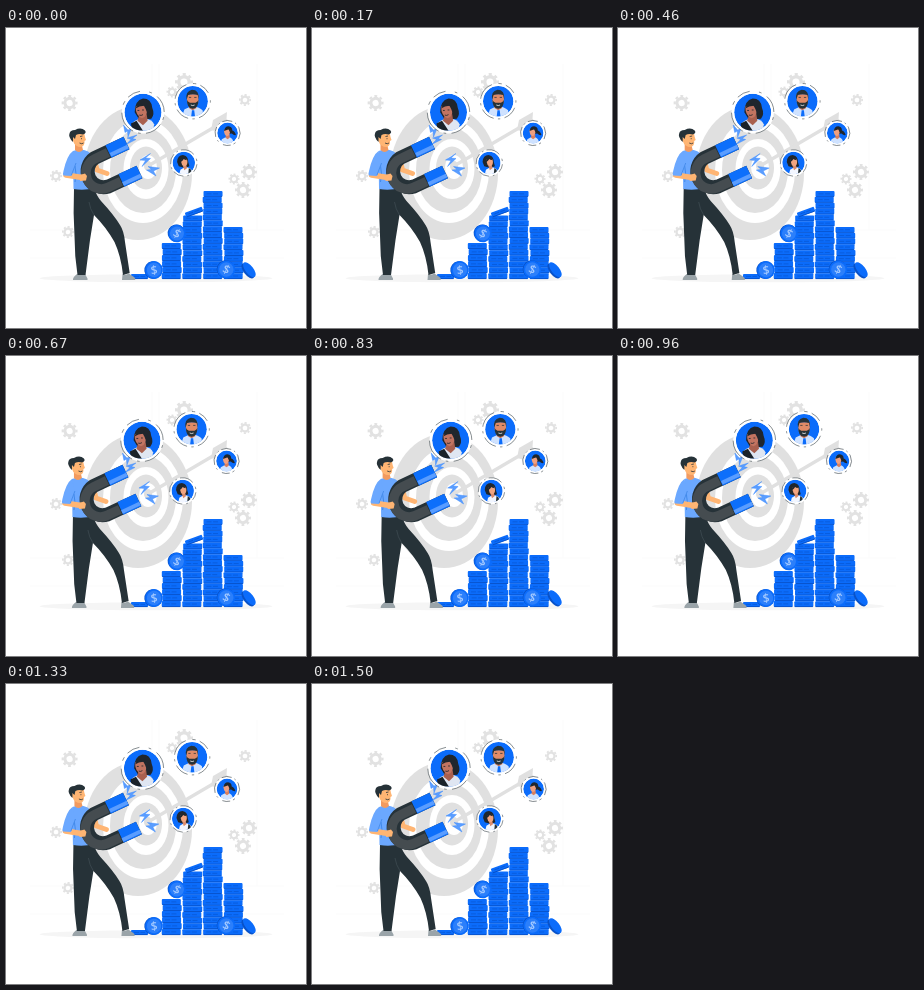
Animation, 300 px wide and 300 px high, one loop 1.54 s. Source, as an HTML page:

```html
<!DOCTYPE html>
<html lang="en">
<head>
<meta charset="utf-8">
<title>Attracting customers</title>
<style>
html, body { margin: 0; width: 100%; height: 100%; overflow: hidden; background: #fff; }
svg { display: block; width: 100%; height: 100%; }
text { font-family: "Open Sans", Arial, sans-serif; font-weight: 600; text-anchor: middle; }
</style>
</head>
<body>
<svg viewBox="0 0 300 300">
  <path d="M24 202H278M24 230H278M146 36V202M153 36V202M251 36V202" fill="none" stroke="#fafafa" stroke-width=".7"/>
  <g id="gears" fill="none" stroke="#e2e2e2"></g>
  <ellipse cx="150" cy="250.300" rx="116.500" ry="4" fill="#f5f5f5"/>

  <g id="target" fill="#e0e0e0">
    <ellipse cx="132" cy="145" rx="54" ry="67"/>
    <ellipse cx="137" cy="143" rx="40" ry="52" fill="#fff"/>
    <ellipse cx="137" cy="142" rx="33" ry="43"/>
    <ellipse cx="140" cy="141" rx="22.500" ry="30" fill="#fff"/>
    <ellipse cx="140" cy="140" rx="16" ry="21.500"/>
    <ellipse cx="142" cy="139" rx="9" ry="12" fill="#fff"/>
    <ellipse cx="142" cy="138" rx="4" ry="5"/>
    <path d="M142 138L212 97" stroke="#e0e0e0" stroke-width="3.300"/>
    <path d="M205 102L207 92L221 84L220.500 91L226 96L213 104Z"/>
  </g>

  <g id="coins"></g>

  <g id="shaker">
    <g id="man">
      <!-- far arm -->
      <path d="M84 129Q90 134 91 142L101 145.500" fill="none" stroke="#ffb573" stroke-width="5" stroke-linecap="round"/>
      <!-- shoes -->
      <path d="M71 246Q75 248 79 246L81.500 250.500V252H67Q66.500 249.500 71 246Z
               M116.500 246Q120 247.500 123 245.500L128.500 249.500Q130 251 129 252H116Z" fill="#9aa4a9"/>
      <!-- legs -->
      <path d="M68 160L88 159Q90 167 95 173Q108 187 114 197Q118 203 119 214L123.700 245L117 247
               Q115 228 108.500 214Q100 199 88 187L84 212L79.500 247H71.500Q68.500 228 68.500 208Q67 185 68 160Z" fill="#263238"/>
      <path d="M88 187Q84 181 83 174" fill="none" stroke="#45525a" stroke-width=".6"/>
      <!-- torso -->
      <path d="M67 123Q72 121 78 122Q86 124 88 131Q89 146 88.500 160Q78 163 67.500 161Q68 150 66 140Z" fill="#6ba8ff"/>
      <path d="M69 138Q71 146 69 154" fill="none" stroke="#2f7be0" stroke-width=".7"/>
      <!-- neck and head -->
      <path d="M69 114V122Q73 126 77 122L75.500 116Z" fill="#f29a5f"/>
      <path d="M66 106Q70 102 78 104L79 109L80 112L78.500 113Q79 118 75 119Q69 119 67 113Q64 112 65 109Z" fill="#ffb573"/>
      <path d="M67 114Q62 109 63.500 105.500Q64 102 69 102Q75 99 79 102.500Q81 105 77 106.500Q73 105.500 70 107L69 111L67 109Z" fill="#263238"/>
      <path d="M74 108.500L76.500 108M75.500 110.200V111.200M73.500 115Q76 116.500 77.500 115" fill="none" stroke="#263238" stroke-width=".8"/>
    </g>

    <g id="magnet" fill="none">
      <g stroke-width="14">
        <path d="M120.500 115L88.600 130A16 16 0 0 0 102.400 158.500L133.500 144" stroke="#263238"/>
        <path d="M120.500 115L102.400 123.500M133.500 144L115.400 152.400" stroke="#0d6ffb"/>
      </g>
      <path d="M102 124.500L89 130.800A15.300 15.300 0 0 0 102.200 159.400L115 153.500" stroke="#454c50" stroke-width="9.500"/>
      <path d="M122 118.500L104.500 126.800M135 147.500L117 156" stroke="#5a9dff" stroke-width="4"/>
    </g>

    <!-- near arm -->
    <path d="M60 147L76 149.500" stroke="#ffb573" stroke-width="5.500" stroke-linecap="round"/>
    <path d="M74 147L79 145.500L81 148L80 152.500L74 153Z" fill="#ffb573"/>
    <path d="M67 123Q61 127 57.500 143Q56.500 146 57.500 147.500L65.500 148L70 136Z" fill="#6ba8ff"/>
    <path d="M65.500 147L70 135" stroke="#2f7be0" stroke-width=".6"/>

    <g id="bolts" fill="#5a9dff" stroke="#2f83ff" stroke-width=".4" stroke-linejoin="round">
      <path d="M117.500 97L119 104.500L121.500 103L122 109L125.500 100.500L122 102Z"/>
      <path d="M131 107L121 110L125 111.500L120 116.500L130 111.500L126.500 110.500Z"/>
      <path d="M144.500 125.500L134 132L139.500 132.500L136 138.500L144.500 130.500L139.500 130Z"/>
      <path d="M153.500 140L142 138.500L145.500 141.500L140.500 142L150 148L147.500 143Z"/>
    </g>

    <g id="people"></g>
  </g>
</svg>
<script>
const get = id => document.getElementById(id);
const BLUE = '#0b6cfb', DEEP = '#0852c9', DARK = '#263238', HAIR = '#20262d';

// x, y, outer radius
const gears = [[63.6, 75, 8], [178, 54, 9], [166, 64, 5.5], [239, 72, 6], [50, 148, 6],
  [62, 204, 6], [243, 144, 8], [228, 151, 5.5], [237, 162, 8]];
get('gears').innerHTML = gears.map(([x, y, r]) => {
  const tooth = 2 * Math.PI * r * .86 / 16;
  return `<g transform="translate(${x} ${y}) rotate(-11.25)">
    <circle r="${r * .58}" stroke-width="${r * .38}"/>
    <circle r="${r * .86}" stroke-width="${r * .28}" stroke-dasharray="${tooth}"/></g>`;
}).join('');

function slab(x, y, w, h) {
  return `<rect x="${x}" y="${y}" width="${w}" height="${h}" rx="1" fill="${BLUE}"/>
    <path d="M${x + .5} ${y + h - .4}h${w - 1}" stroke="${DEEP}" stroke-width=".9"/>
    <path d="M${x + 3} ${y + h * .48}h${w - 6}" stroke="${DEEP}" stroke-width=".6" stroke-dasharray="5 1.5"/>`;
}

function stack(x, top, n) {
  const h = (251 - top) / n;
  return Array.from({ length: n }, (_, i) =>
    slab(x + Math.sin(i * 2.3 + x) * .5, top + i * h, 19, h)).join('');
}

function coin(x, y, r, tilt) {
  return `<g transform="translate(${x} ${y}) rotate(${tilt})">
    <circle cx="-.8" r="${r}" fill="${DEEP}"/><circle r="${r}" fill="${BLUE}"/>
    <circle r="${r - 1.7}" fill="#2b7ffb"/>
    <text y="4.200" font-size="12" fill="#a3c9ff">$</text></g>`;
}

get('coins').innerHTML = stack(156.2, 215, 6) + stack(176.8, 187.5, 11) + stack(197.2, 163, 15) + stack(218, 199, 9) +
  `<g transform="rotate(-20 188 184)">${slab(179, 181.5, 18, 5)}</g>` +
  slab(125, 246, 17, 5) +
  `<g transform="rotate(52 243 242)"><ellipse cx="243" cy="243.500" rx="9" ry="4" fill="${DEEP}"/>
   <ellipse cx="243" cy="241.500" rx="9" ry="4" fill="${BLUE}"/></g>` +
  coin(171, 205.5, 8.7, 30) + coin(148, 242, 8.9, -8) + coin(220.3, 241.5, 8.9, 25);

// Busts are drawn in a unit of 20 around the badge centre
const busts = [
  `<path d="M-9 0Q-9 -13 0 -15Q9 -15 10 -5Q13 2 9 7L-4 8Z" fill="${HAIR}"/>
   <path d="M-13 20L-11 11Q-5 6 3 7Q10 8 12 13L11 20Z" fill="#dfe6f2"/>
   <path d="M-4 3L4 2L5 9L0 14L-6 9Z" fill="#a9604f"/>
   <path d="M-8 -6Q-3 -10 4 -6Q6 4 -1 6.500Q-8 4 -8 -6Z" fill="#c27461"/>
   <path d="M-8 -4Q-6 -11 1 -10Q6 -8 5 2Q3 -4 1 -7Q-4 -7 -8 -4Z" fill="${HAIR}"/>
   <path d="M-6 -2H-4M-1 -2.500H1M-4 3Q-2 4 0 2.500" fill="none" stroke="${HAIR}" stroke-width=".9"/>
   <path d="M-13 12L-7 9L0 20H-12Z" fill="#1a2229"/>`,
  `<path d="M-14 20L-11 11Q-4 7 0 7Q8 7 13 12L14 20Z" fill="#cfe2ff"/>
   <path d="M-4 3H4L5 9L0 12L-5 9Z" fill="#c97355"/>
   <path d="M-7.500 -9H7.500V1Q5 8 0 8Q-6 7 -7.500 0Z" fill="#e08b67"/>
   <path d="M-8 -2Q-10 -13 -1 -15Q9 -15 8 -2L6.500 -8Q0 -10 -6 -8Z" fill="${DARK}"/>
   <path d="M-7.500 -2Q-5.500 3 0 2Q5.500 3 7.500 -2Q8 9 0 10Q-8 9 -7.500 -2Z" fill="${DARK}"/>
   <path d="M-5 -5H-2M2 -5H5" stroke="${DARK}" stroke-width="1"/>
   <path d="M-2.500 5Q0 6.500 2.500 5" fill="none" stroke="#fff" stroke-width="1"/>
   <path d="M-1 12H2L3 20H-2Z" fill="${BLUE}"/>`,
  `<path d="M-12 -2Q-11 -15 0 -14Q8 -12 8 -2L10 6L2 9L-9 6Z" fill="${HAIR}"/>
   <path d="M-8 20L-6 12Q0 7 7 8Q14 10 16 16L9 20Z" fill="#f2f6ff"/>
   <path d="M-2 4L4 3L6 9L1 13Z" fill="#d98b6c"/>
   <path d="M-5 -6Q0 -10 6 -6Q8 3 2 6Q-5 5 -5 -6Z" fill="#f2a580"/>
   <path d="M-7 -1Q-4 -11 2 -10L6 -5Q1 -5 0 -7Q-2 -3 -7 -1Z" fill="${HAIR}"/>
   <path d="M9 9L13 12L14 18L8 20Z" fill="${DARK}"/>`,
  `<path d="M-6 -4Q-6 -13 2 -13Q9 -12 9 -5Q14 -4 16 4Q12 5 8 1L0 2Z" fill="${HAIR}"/>
   <path d="M-14 20L-11 12Q-4 7 4 8Q10 10 11 17L8 20Z" fill="#cfe2ff"/>
   <path d="M-3 3H4L4 9L0 12L-4 9Z" fill="#d9805f"/>
   <path d="M-7 -6Q-2 -9 5 -6Q5 4 -1 6Q-7 4 -7 -6Z" fill="#f0a080"/>
   <path d="M-7 -4Q-5 -11 1 -11Q7 -8 6 0Q3 -3 2 -7Q-3 -5 -7 -4Z" fill="${HAIR}"/>`
];

// x, y, disc radius, ring radius
const badges = [[137, 84.3, 18.5, 21.2], [186.7, 73.2, 15.2, 17.7], [177.8, 135, 11.2, 13.2], [221.6, 105, 10.4, 12.5]];
get('people').innerHTML = badges.map(([x, y, r, ring], i) =>
  `<clipPath id="clip${i}"><circle r="20"/></clipPath>
   <g transform="translate(${x} ${y})">
    <circle r="${ring}" fill="#fff"/>
    <circle r="${ring}" fill="none" stroke="${DARK}" stroke-width=".5" pathLength="100"
      stroke-dasharray="13 4 2 4 17 6 3 4 10 7 2 5" transform="rotate(${35 + i * 70})"/>
    <g transform="scale(${r / 20})" clip-path="url(#clip${i})"><circle r="20" fill="${BLUE}"/>${busts[i]}</g>
   </g>`).join('');

// Sideways shake: one stop per tenth of the cycle, each leg eased, shown at 24 pictures a second
const LOOP = 1540, CYCLE = 1500, STEP = 1000 / 24;
const stops = [0, -.6, 1.2, -2.4, 2.4, -2.4, 2.4, -2.4, 1.2, -.6, 0];
const bezier = (a, b, u) => 3 * a * u * (1 - u) ** 2 + 3 * b * u * u * (1 - u) + u ** 3;

function ease(x) {
  let lo = 0, hi = 1;
  for (let i = 0; i < 20; i++) {
    const mid = (lo + hi) / 2;
    if (bezier(.36, .19, mid) < x) lo = mid; else hi = mid;
  }
  return bezier(.07, .97, lo);
}

function shake(ms) {
  const p = Math.min(ms / CYCLE, 1) * 10;
  const i = Math.min(Math.floor(p), 9);
  return stops[i] + (stops[i + 1] - stops[i]) * ease(p - i);
}

// Delays are whole hundredths of a second, so a step may come up to 5 ms early
const hold = ms => Math.floor((ms + 5) / STEP) * STEP;

const shaker = get('shaker');
const start = performance.now();
function draw(now) {
  const ms = Math.max(0, now - start) % LOOP;
  shaker.setAttribute('transform', `translate(${shake(hold(ms)).toFixed(3)} 0)`);
  requestAnimationFrame(draw);
}
draw(start);
</script>
</body>
</html>
```
